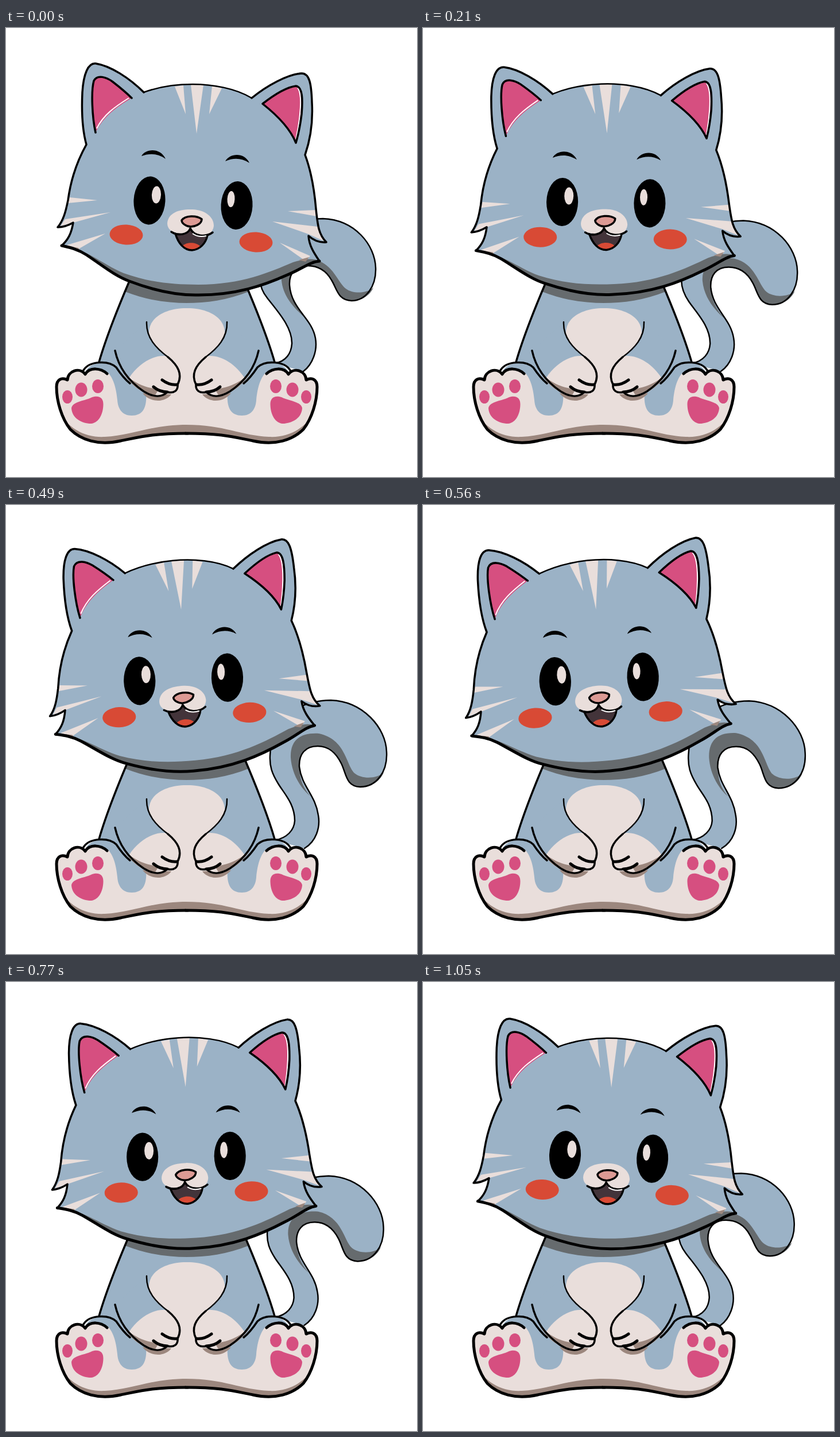
Recreate the animation shown at these times as an HTML page. Size 716 by 782 pixels, loop 1.12 s.

```html
<!DOCTYPE html>
<html lang="en">
<head>
<meta charset="utf-8">
<title>Sitting cat</title>
<style>
  html, body { margin: 0; width: 100%; height: 100%; overflow: hidden; background: #fff; }
  svg { display: block; width: 716px; height: 782px; }
  .blue { fill: #9bb2c6; }
  .cream { fill: #e9dedb; }
  .pink { fill: #d64f80; }
  .red { fill: #d84a35; }
  .grey { fill: #666b6e; }
  .brown { fill: #9c877e; }
  .line { fill: none; stroke: #000; stroke-width: 3.5; stroke-linecap: round; stroke-linejoin: round; }
  .bold { stroke-width: 5; }
  .fine { stroke-width: 2.5; }
  .glint { fill: none; stroke: #fff; stroke-width: 2; }
</style>
</head>
<body>
<svg viewBox="0 0 716 782">
  <path class="blue" id="tail"/>
  <path class="grey" id="tailShade"/>
  <path class="line fine" id="tailLine"/>

  <g id="half">
    <!-- torso -->
    <path class="blue" d="M214 440C194 490 174 540 161 585L165 640H317V440Z"/>
    <path class="grey" d="M214 440L207 459C245 474 280 479 317 479V440Z"/>
    <path class="line" d="M214 443C194 490 174 540 162 582"/>
    <path class="cream" d="M317 488C285 487 250 500 249 530V650H317Z"/>
    <!-- leg and foot -->
    <path class="cream" d="M317 706C255 706 235 712 200 719C160 728 130 717 112 699C97 680 88 650 88 625C88 612 97 608 107 613C108 597 128 590 138 603C146 590 168 592 180 597L240 625H317Z"/>
    <path class="brown" d="M92 664C105 698 140 714 172 712C220 710 250 691 317 691V706C255 706 235 712 200 719C160 728 130 717 112 699C103 687 96 675 92 664Z"/>
    <path class="blue" d="M138 600C145 580 180 578 196 595L244 635C246 662 238 675 219 675C203 675 195 664 194 648C192 625 185 602 172 597C158 592 145 595 138 603Z"/>
    <path class="line bold" d="M317 706C255 706 235 712 200 719C160 728 130 717 112 699C97 680 88 650 88 625C88 612 97 608 107 613C108 597 128 590 138 603C146 590 165 592 176 602"/>
    <path class="line" d="M135 596C145 580 178 578 192 591C200 603 207 612 216 619"/>
    <!-- paw pads -->
    <g class="pink">
      <path d="M114 662C116 650 140 649 150 643C163 639 170 645 169.500 656C169 675 160 690 145 689C128 687 115 678 114 662Z"/>
      <ellipse cx="107" cy="642.500" rx="9" ry="11.500"/>
      <ellipse cx="131" cy="630" rx="10.500" ry="12.500"/>
      <ellipse cx="160" cy="624" rx="10" ry="12"/>
    </g>
    <!-- arm -->
    <path class="brown" d="M238 636C250 652 276 654 288 638Z"/>
    <path class="blue" d="M245 512C244 540 262 558 282 573L240 634C215 618 196 594 190 562Z"/>
    <path class="cream" d="M214 610C230 585 255 570 276 571L282 573C300 588 308 603 299 621C300 632 290 637 280 634C272 645 255 643 240 635Z"/>
    <path class="brown" d="M203 598C214 612 238 627 266 629L259 641C235 637 213 617 203 598Z"/>
    <path class="line" d="M190 562C196 590 212 614 240 633C258 644 272 643 281 634C293 637 300 631 299 621C308 603 300 588 282 573"/>
    <path class="line fine" d="M282 573C262 558 244 540 245 512"/>
    <path class="line bold" d="M272 613C280 619 289 622 298 621M257 625C264 631 272 634 281 634"/>
  </g>
  <use href="#half" transform="matrix(-1 0 0 1 630 0)"/>

  <g id="head">
    <path class="blue" d="M240 112C215 87 182 66 157 62C143 60 135 80 133 112C131 155 135 185 140 203C122 235 112 270 108 300C104 320 100 335 90 347C100 347 110 343 117 339C114 358 108 369 97 379C110 382 125 385 140 395C170 415 190 432 215 441C260 458 300 465 330 465C400 466 450 448 490 430C515 420 530 407 546 406C538 394 528 380 527 362C537 371 547 374 558 373C545 360 543 345 540 315C537 280 530 245 521 221C530 195 535 165 533 130C532 95 528 79 515 79C490 81 455 100 428 122C400 105 360 98 325 98C290 98 262 104 240 112Z"/>
    <g class="cream">
      <path d="M294 102L309 100L313 150ZM322 99H344L332 184ZM359 101L376 105L354 150Z"/>
      <path d="M111 295L159 300L108 305ZM182 321L103 333L95 345L117 339ZM173 358L106 378L126 385Z"/>
      <path d="M491 319L540 317L541 328ZM464 337L543 346L554 371L527 359ZM477 374L530 397L522 406Z"/>
    </g>
    <path class="grey" d="M97 379C140 384 165 410 205 427C250 443 290 447 335 447C410 447 460 425 500 408C520 402 535 400 546 406C530 407 515 420 490 430C450 448 400 466 330 465C300 465 260 458 215 441C190 432 170 415 140 395C125 385 110 382 97 379Z"/>
    <path class="brown" d="M106 379L126 383L130 389ZM510 404L528 399L522 407Z"/>
    <path class="line" d="M240 112C215 87 182 66 157 62C143 60 135 80 133 112C131 155 135 185 140 203C122 235 112 270 108 300C104 320 100 335 90 347C100 347 110 343 117 339C114 358 108 369 97 379M546 406C538 394 528 380 527 362C537 371 547 374 558 373C545 360 543 345 540 315C537 280 530 245 521 221C530 195 535 165 533 130C532 95 528 79 515 79C490 81 455 100 428 122"/>
    <path class="line fine" d="M428 122C400 105 360 98 325 98C290 98 262 104 240 112"/>
    <path class="line bold" d="M97 379C110 382 125 385 140 395C170 415 190 432 215 441C260 458 300 465 330 465C400 466 450 448 490 430C515 420 530 407 546 406"/>
    <!-- inner ears -->
    <path class="pink" d="M156 182C150 155 148 110 153 92C159 80 175 86 185 93C198 103 209 112 219 122C192 138 170 154 156 182Z"/>
    <path class="pink" d="M447 132C470 114 490 103 505 101C517 102 517 125 515 150C512 175 508 190 505 200C497 180 480 158 447 132Z"/>
    <path class="glint" d="M214 122C190 137 170 151 158 175M508 104C514 112 514 130 512 150C510 172 507 184 505 194"/>
    <path class="line" d="M156 182C150 155 148 110 153 92C159 80 175 86 185 93C198 103 209 112 219 122M505 200C497 180 480 158 447 132C470 114 490 103 505 101C517 102 517 125 515 150C512 175 508 190 505 200"/>
    <!-- brows and eyes -->
    <path d="M236 223C243 210 269 208 278 228C264 218 250 218 236 223ZM382 232C390 218 415 216 424 235C410 226 396 226 382 232Z"/>
    <ellipse cx="250" cy="300.500" rx="27.500" ry="42" transform="rotate(3 250 300)"/>
    <ellipse cx="402" cy="309" rx="27.500" ry="42" transform="rotate(3 402 309)"/>
    <ellipse class="cream" cx="262" cy="290.500" rx="8" ry="15" transform="rotate(3 262 290)"/>
    <ellipse class="cream" cx="392" cy="298" rx="6.500" ry="14" transform="rotate(3 392 298)"/>
    <!-- cheeks -->
    <ellipse class="red" cx="209.500" cy="360" rx="29" ry="17.500" transform="rotate(3 209 360)"/>
    <ellipse class="red" cx="435.500" cy="373" rx="29" ry="17.500" transform="rotate(3 435 373)"/>
    <!-- muzzle and mouth -->
    <path d="M295 358C300 375 310 388 324 388C338 387 348 375 351 361L321 352Z" fill="#43343a"/>
    <path class="red" d="M307 380C315 372 331 373 338 380C330 389 315 388 307 380Z"/>
    <path class="line" d="M295 358C300 375 310 387 324 387C338 386 348 375 351 361"/>
    <path class="cream" d="M281 340C283 320 305 315 325 316C348 317 362 330 362 344C361 358 347 364 336 362C328 361 324 357 321 352C316 357 308 359 298 357C288 355 281 350 281 340Z"/>
    <path class="line" d="M288 355C300 363 317 360 321 349C327 363 348 365 360 356"/>
    <path class="glint" d="M325 358C332 363 341 364 349 362"/>
    <path class="line" style="fill:#dc9a94" d="M306 335C312 326 332 326 341 333C341 342 328 346 322 346C314 346 306 340 306 335Z"/>
  </g>
</svg>
<script>
  const STEP = 70, STEPS = 16;
  const $ = id => document.getElementById(id);

  // Each pair holds the tail's right-tilt pose and its pose at k = 1.
  const tail = [
    "M468 584C488 581 497 566 498 550C499 520 470 490 455 470C447 460 443 450 443 440C443 380 490 332 552 332C608 334 643 378 644 418C645 450 627 475 602 475C578 474 577 455 567 439C558 423 545 414 525 414C503 414 493 428 494 448C497 490 533 505 539 540C543 562 534 586 518 598",
    "M468 584C490 580 502 566 503 550C503 520 484 502 474 485C463 467 459 455 460 436C462 380 500 341 566 340C622 342 662 388 663 430C665 465 645 491 617 491C592 490 593 468 584 450C575 432 563 420 543 420C521 420 510 434 511 456C515 490 539 505 544 540C548 562 540 586 520 598"
  ];
  const shade = [
    "M640 452C630 462 605 464 592 454C578 443 570 412 540 404C500 400 478 415 480 440C483 470 505 490 521 505C505 487 495 470 494 448C493 428 503 414 525 414C545 414 558 423 567 439C577 455 578 474 602 475C622 475 635 464 640 452",
    "M658 466C646 477 620 478 607 467C592 452 592 408 545 398C510 396 495 412 496 440C498 470 515 495 530 507C518 492 512 480 511 456C510 434 521 420 543 420C563 420 575 432 584 450C593 468 592 490 617 491C640 491 653 478 658 466"
  ];

  function blend([a, b], k) {
    const ends = b.match(/\d+/g);
    let i = 0;
    return a.replace(/\d+/g, v => (+v + (ends[i++] - v) * k).toFixed(2));
  }

  function draw(now) {
    const n = Math.floor(now / STEP) % STEPS;
    const k = Math.min(n, STEPS - n) / 7;
    const d = blend(tail, k);
    $("tail").setAttribute("d", d);
    $("tailLine").setAttribute("d", d);
    $("tailShade").setAttribute("d", blend(shade, k));
    // Tilt around the neck at (312, 508).
    const b = -0.094 * k, c = 0.083 * k;
    $("head").setAttribute("transform", `matrix(1 ${b} ${c} 1 ${-508 * c} ${-312 * b})`);
  }

  const start = performance.now();
  function tick() {
    draw(performance.now() - start);
    requestAnimationFrame(tick);
  }
  tick();
</script>
</body>
</html>
```
